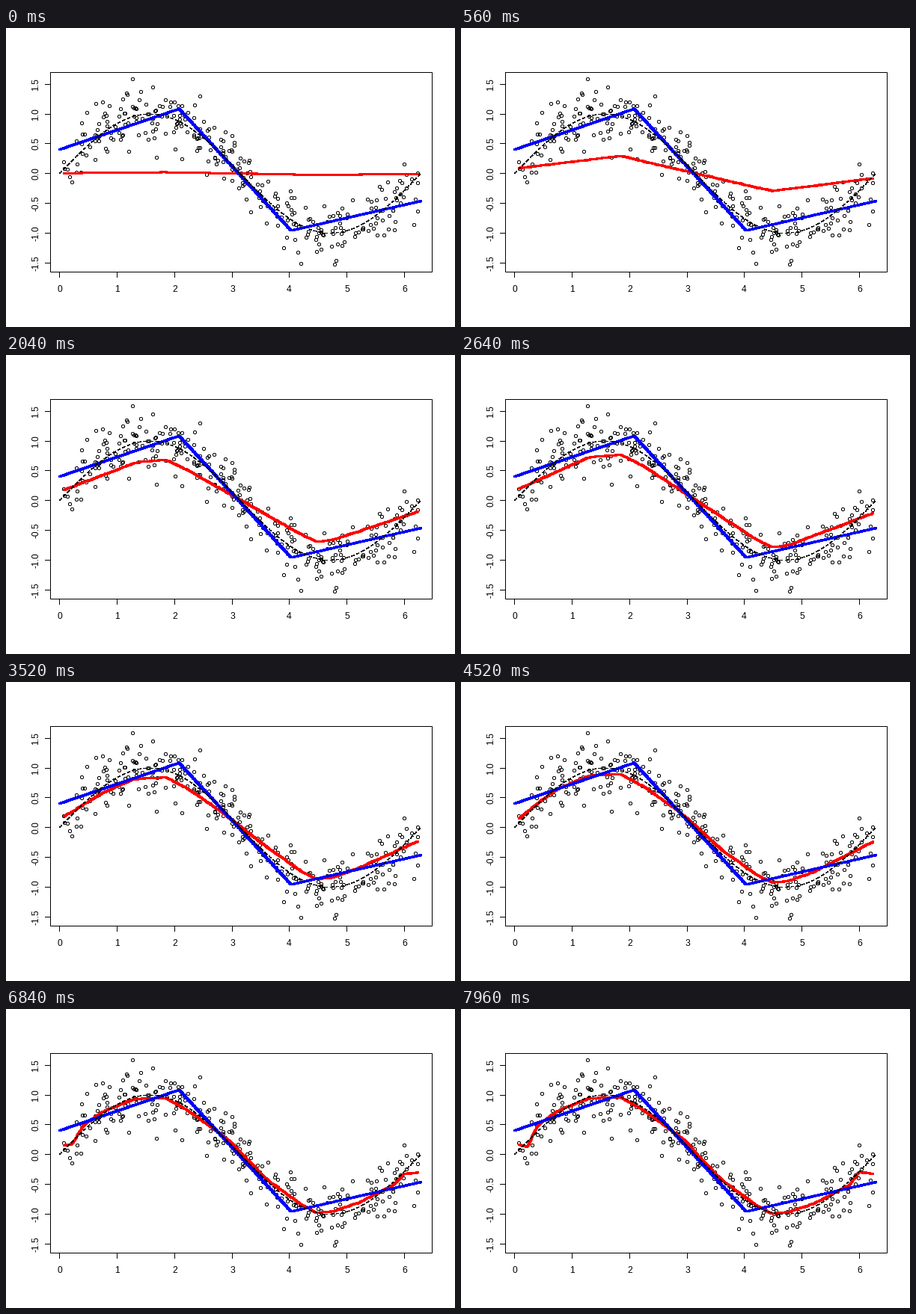
These frames come from a looping animation (600 px wide and 400 px high, 8 s). A matplotlib script:

```python
import math

import numpy as np
import matplotlib.pyplot as plt
from matplotlib.animation import FuncAnimation
from matplotlib.collections import LineCollection

W, H, DPI = 600, 400, 100
PX = 72 / DPI                       # one pixel in points
LEFT, RIGHT, TOP, BOTTOM = 59.04, 569.76, 59.04, 326.56
N, STEPS, RATE = 300, 200, 0.02


# ---- sample: noisy sine, Mersenne Twister with inversion normals ----
def twister(seed):
    def lcg(s):
        return (69069 * s + 1) % 2**32

    for _ in range(51):
        seed = lcg(seed)
    key = []
    for _ in range(624):
        seed = lcg(seed)
        key.append(seed)
    rs = np.random.RandomState()
    rs.set_state(("MT19937", np.array(key, dtype=np.uint32), 624))
    return rs


def uniform(rs, n):
    return rs.randint(0, 2**32, n, dtype=np.uint32) * 2.3283064365386963e-10


def normal_quantile(p):
    cdf = np.vectorize(lambda z: 0.5 * math.erfc(-z / math.sqrt(2)))
    lo, hi = np.full(p.shape, -7.0), np.full(p.shape, 7.0)
    for _ in range(45):
        mid = (lo + hi) / 2
        below = cdf(mid) < p
        lo, hi = np.where(below, mid, lo), np.where(below, hi, mid)
    return (lo + hi) / 2


def sample():
    rs = twister(1)
    x = np.sort(uniform(rs, N) * 2 * np.pi)
    u = uniform(rs, 2 * N).reshape(N, 2)
    big = 134217728
    z = normal_quantile((np.floor(big * u[:, 0]) + u[:, 1]) / big)
    return x, np.sin(x) + z / 4


# ---- linear splines ----
def hinge(x, knots):
    return np.maximum(x[:, None] - np.asarray(knots)[None, :], 0)


def basis(x, knots):
    return np.column_stack([np.ones_like(x), x, hinge(x, knots)])


def boost(x, y):
    """Sum of shrunken two-knot splines, best knots chosen at every step."""
    knots = np.linspace(x[0], x[-1], 302)[1:-1]
    q, _ = np.linalg.qr(basis(x, []))
    h = hinge(x, knots)
    h -= q @ (q.T @ h)
    gram = h.T @ h
    d = np.diag(gram)
    prod = np.outer(d, d)
    det = prod - gram**2
    idx = np.arange(len(knots))
    ok = (idx[None, :] - idx[:, None] >= 3) & (det > 1e-9 * prod)
    inv = np.where(ok, 1 / np.where(ok, det, 1), 0)
    own, cross = d[None, :] * inv, 2 * gram * inv
    other = d[:, None] * inv

    total, curves = np.zeros_like(y), []
    for _ in range(STEPS):
        r = y - total
        c = h.T @ r
        gain = (c**2)[:, None] * own - np.outer(c, c) * cross + (c**2)[None, :] * other
        pair = list(np.unravel_index(np.argmax(gain), gain.shape))
        coef = np.linalg.solve(gram[np.ix_(pair, pair)], c[pair])
        total = total + RATE * (q @ (q.T @ r) + h[:, pair] @ coef)
        curves.append(total)
    return curves


x, y = sample()
curves = boost(x, y)
grid = np.arange(0, 2 * np.pi, 0.01)
thirds = np.quantile(x, [1 / 3, 2 / 3])
beta = np.linalg.lstsq(basis(x, thirds), y, rcond=None)[0]
fixed = basis(grid, thirds) @ beta


# ---- data to pixel centres ----
def scaler(v, start, end):
    lo, hi = v.min(), v.max()
    pad = 0.04 * (hi - lo)
    k = (end - start) / (hi - lo + 2 * pad)
    return lambda t: np.floor(start + (t - lo + pad) * k) + 0.5


to_x = scaler(x, LEFT, RIGHT)
to_y = scaler(y, BOTTOM, TOP)

plt.rcParams["font.family"] = "Liberation Sans"
plt.rcParams["path.simplify"] = False
fig = plt.figure(figsize=(W / DPI, H / DPI), dpi=DPI, facecolor="white")
ax = fig.add_axes([0, 0, 1, 1])
ax.set_xlim(0, W)
ax.set_ylim(H, 0)
ax.axis("off")


def stroke(xs, ys, color="black", width=1, **kw):
    return ax.plot(xs, ys, color=color, lw=width * PX, snap=False, **kw)[0]


# points as small rings
ring = np.array([(-2, -1), (-2, 1), (-1, 2), (1, 2), (2, 1),
                 (2, -1), (1, -2), (-1, -2), (-2, -1)])
centres = np.column_stack([to_x(x), to_y(y)])
rings = LineCollection(list(centres[:, None, :] + ring), colors="black",
                       linewidths=PX, zorder=1)
rings.set_snap(False)
ax.add_collection(rings)

# curves
bold = dict(width=3, antialiased=False, solid_capstyle="round",
            solid_joinstyle="round")
red = stroke(to_x(x), to_y(curves[0]), "#ff0000", zorder=2, **bold)
stroke(to_x(grid), to_y(fixed), "#0000ff", zorder=3, **bold)
stroke(to_x(grid), to_y(np.sin(grid)), antialiased=False, zorder=4,
       dashes=(5, 3), dash_capstyle="butt")

# frame, ticks, labels
l, r, t, b = (math.floor(v) + 0.5 for v in (LEFT, RIGHT, TOP, BOTTOM))
stroke([l, r, r, l, l], [t, t, b, b, t], zorder=5,
       solid_joinstyle="miter", solid_capstyle="projecting")
label = dict(fontsize=12 * PX, ha="center", va="baseline", color="black")
for v in range(7):
    px = to_x(v)
    stroke([px, px], [b, b + 7.5], zorder=5, solid_capstyle="butt")
    ax.text(px, 353, str(v), **label)
for i in range(-3, 4):
    py = to_y(i / 2)
    stroke([l - 7.5, l], [py, py], zorder=5, solid_capstyle="butt")
    ax.text(43, py, f"{i / 2:.1f}", rotation=90, rotation_mode="anchor", **label)


def update(k):
    red.set_ydata(to_y(curves[k]))
    return (red,)


anim = FuncAnimation(fig, update, frames=STEPS, interval=40, repeat=True)
plt.show()
```
